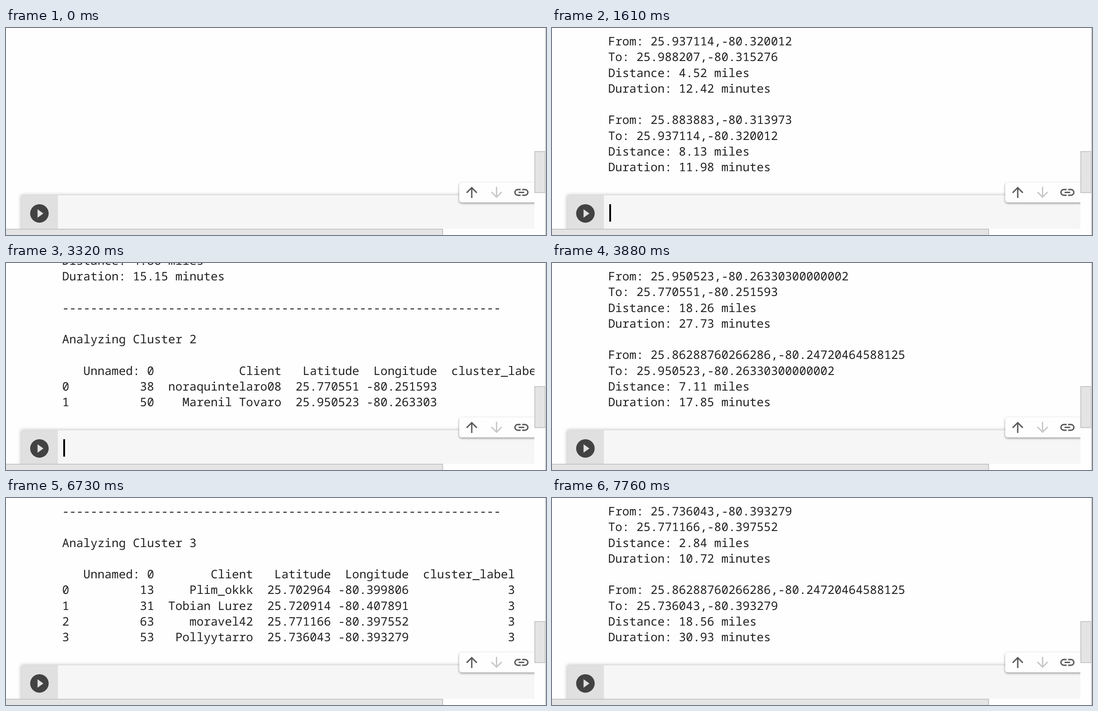
Write an HTML page that moves like this. It is 1207 px wide and 464 px high and loops after 7.99 s.

```html
<!DOCTYPE html>
<html lang="en">
<head>
<meta charset="utf-8">
<title>Notebook output</title>
<style>
  html, body { margin: 0; width: 100%; height: 100%; overflow: hidden; background: #fefefe; }
  svg { display: block; width: 100%; height: 100%; }
  #log text {
    font: 26.37px "Noto Sans Mono", "DejaVu Sans Mono", monospace;
    white-space: pre;
    fill: #212121;
    text-rendering: geometricPrecision;
  }
  .cell { filter: drop-shadow(0 0 4px rgba(0, 0, 0, .3)); }
  .toolbar { filter: drop-shadow(0 2px 2.5px rgba(0, 0, 0, .42)); }
  .icon { fill: none; stroke: #5c5c5c; stroke-width: 3.1; }
  .off { stroke: #c9c9c9; }
  .bar { fill: #e4e4e4; stroke: #c6c6c6; stroke-width: 2; }
</style>
</head>
<body>
<svg viewBox="0 0 1207 464" preserveAspectRatio="none">
  <defs>
    <clipPath id="outputClip"><rect width="1181" height="350"/></clipPath>
    <clipPath id="pageClip"><rect width="1181" height="450"/></clipPath>
    <path id="arrow" d="M-11.4 .9 0-10.5 11.4 .9M0-10V12.4"/>
    <path id="hook" d="M-1.7-6.4H-8a6.4 6.4 0 0 0 0 12.8h6.3"/>
  </defs>
  <rect width="1207" height="464" fill="#fefefe"/>

  <g clip-path="url(#outputClip)"><g id="log"></g></g>

  <g clip-path="url(#pageClip)">
    <rect class="cell" x="34" y="375" width="1200" height="120" fill="#f6f6f6"/>
    <rect x="34" y="375" width="82" height="75" fill="#e0e0e0"/>
    <circle cx="74.7" cy="415.7" r="20.7" fill="#424242"/>
    <path d="M70.5 406.2v19l13-9.5z" fill="#e0e0e0"/>
    <rect id="caret" x="128" y="395" width="4" height="39"/>
    <rect class="toolbar" x="1013" y="346" width="200" height="45" rx="6" fill="#fefefe"/>
    <use href="#arrow" class="icon" transform="translate(1041 368.5)"/>
    <use href="#arrow" class="icon off" transform="translate(1096.5 368.5) rotate(180)"/>
    <g class="icon" transform="translate(1152 368.5)">
      <use href="#hook"/>
      <use href="#hook" transform="scale(-1 1)"/>
      <path d="M-6.3 0H6.3"/>
    </g>
  </g>

  <rect class="bar" x="-2" y="451" width="978" height="20"/>
  <rect class="bar" x="1182" y="277" width="23" height="92"/>
  <path d="M1206 0V464" stroke="#d2d2d2" stroke-width="2"/>
</svg>
<script>
const LOOP = 7990;
const LEFT = 125.4;
const PITCH = 35.28;
const FIRST_BASELINE = 34.5;
const LAST_BASELINE = 321.3;
const DEPOT = "25.86288760266286,-80.24720464588125";

const leg = (from, to, miles, minutes) => [
  `From: ${from}`, `To: ${to}`,
  `Distance: ${miles} miles`, `Duration: ${minutes} minutes`, ""
];

function cluster(label, nameWidth, clients) {
  const row = (index, id, name, lat, lon, tag) =>
    String(index).padEnd(3) + String(id).padStart(10) + "  " + name.padStart(nameWidth) +
    lat.padStart(11) + lon.padStart(11) + String(tag).padStart(15);
  return [
    "-".repeat(62), "", `Analyzing Cluster ${label}`, "",
    row("", "Unnamed: 0", "Client", "Latitude", "Longitude", "cluster_label"),
    ...clients.map((client, i) => row(i, ...client, label)), ""
  ];
}

const lines = [
  "To: 25.891306,-80.335112", "Distance: 1.33 miles", "Duration: 4.52 minutes", "",
  ...leg("25.988207,-80.315276", "25.887652,-80.31809799999998", "8.73", "18.30"),
  ...leg("25.937114,-80.320012", "25.988207,-80.315276", "4.52", "12.42"),
  ...leg("25.883883,-80.313973", "25.937114,-80.320012", "8.13", "11.98"),
  ...leg(DEPOT, "25.883883,-80.313973", "4.86", "15.15"),
  ...cluster(2, 16, [
    [38, "noraquintelaro08", "25.770551", "-80.251593"],
    [50, "Marenil Tovaro", "25.950523", "-80.263303"]
  ]),
  ...leg("25.950523,-80.26330300000002", "25.770551,-80.251593", "18.26", "27.73"),
  ...leg(DEPOT, "25.950523,-80.26330300000002", "7.11", "17.85"),
  ...cluster(3, 12, [
    [13, "Plim_okkk", "25.702964", "-80.399806"],
    [31, "Tobian Lurez", "25.720914", "-80.407891"],
    [63, "moravel42", "25.771166", "-80.397552"],
    [53, "Pollyytarro", "25.736043", "-80.393279"]
  ]),
  ...leg("25.720914,-80.407891", "25.702964,-80.39980600000001", "1.92", "6.35"),
  ...leg("25.771166,-80.397552", "25.720914,-80.407891", "4.61", "13.27"),
  ...leg("25.736043,-80.393279", "25.771166,-80.397552", "2.84", "10.72"),
  ...leg(DEPOT, "25.736043,-80.393279", "18.56", "30.93")
];

// [time, index of the last printed line]; from 1300 ms the view sticks to that line
const prints = [
  [0, -1], [750, 2], [990, 7], [1220, 12], [1300, 12], [1610, 17], [3000, 22],
  [3320, 30], [3560, 35], [3880, 40], [5440, 50], [6980, 55], [7210, 60],
  [7440, 65], [7760, 70]
];
const blinks = [310, 750, 1220, 1770, 2230, 2770, 3240, 3720, 4270, 4740, 5210, 5750, 6190, 6730, 7210, 7670];

const log = document.getElementById("log");
const caret = document.getElementById("caret");
const rows = lines.map((line, i) => {
  const text = document.createElementNS("http://www.w3.org/2000/svg", "text");
  text.setAttribute("x", LEFT);
  text.setAttribute("y", i * PITCH);
  text.textContent = line;
  log.append(text);
  return text;
});

let shown = null;
function draw() {
  const t = performance.now() % LOOP;
  caret.style.display = blinks.filter(time => time <= t).length % 2 ? "" : "none";
  const step = prints.findLast(([time]) => time <= t);
  if (step !== shown) {
    shown = step;
    const [time, last] = step;
    const top = time < 1300 ? FIRST_BASELINE - PITCH : LAST_BASELINE - last * PITCH;
    log.setAttribute("transform", `translate(0 ${top.toFixed(2)})`);
    rows.forEach((row, i) => { row.style.display = i <= last ? "" : "none"; });
  }
  requestAnimationFrame(draw);
}
draw();
</script>
</body>
</html>
```
